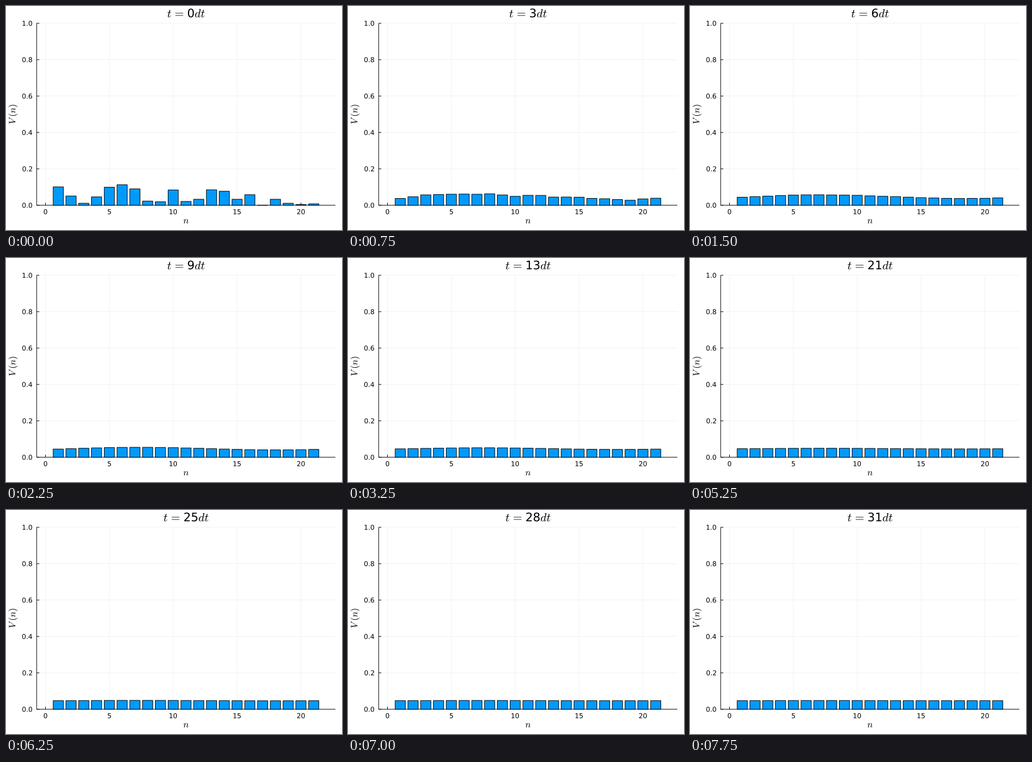
A matplotlib script for the animation above (8000 ms loop, 600x400 px).

```python
import numpy as np
import matplotlib.pyplot as plt
from matplotlib.animation import FuncAnimation
from matplotlib.patches import PathPatch, Rectangle
from matplotlib.textpath import TextPath
from matplotlib.transforms import Affine2D

plt.rcParams["font.family"] = "DejaVu Sans"
plt.rcParams["mathtext.fontset"] = "cm"

W, H, DPI = 600, 400, 100
PX = 72 / DPI  # points per pixel
STEPS, INTERVAL = 32, 250
LEFT, RIGHT, TOP, BASE = 54.8, 588.2, 30.87, 355.8
MID_X, MID_Y = (LEFT + RIGHT) / 2, (TOP + BASE) / 2
X0, UNIT = 70.5, 22.81
TICK = 4.72

START = np.array([101, 51, 11, 46, 99, 113, 90, 23, 19, 84, 21,
                  33, 85, 77, 33, 58, 1, 33, 11, 4, 8]) / 1000


def diffuse(v):
    """Random hop of one or two sites either way on a ring."""
    return sum(np.roll(v, k) for k in (-2, -1, 1, 2)) / 4


states = [START]
for _ in range(STEPS - 1):
    states.append(diffuse(states[-1]))

fig = plt.figure(figsize=(W / DPI, H / DPI), dpi=DPI, facecolor="white")
ax = fig.add_axes([0, 0, 1, 1])
ax.set_xlim(0, W)
ax.set_ylim(H, 0)
ax.axis("off")


def px(n):
    return X0 + UNIT * n


def py(v):
    return BASE - (BASE - TOP) * v


def line(x, y, width=1, z=2, alpha=1):
    ax.plot(x, y, color="black", lw=PX * width, alpha=alpha, zorder=z,
            solid_capstyle="butt", snap=False)


def grid(x, y):
    line(x, y, width=0.5, z=1, alpha=0.1)


def outline(s, size, x, y, align=0.5, turn=0):
    """Glyph outlines on baseline y; align 0..1 picks the anchor in the ink."""
    path = TextPath((0, 0), s, size=size)
    box = path.get_extents()
    anchor = box.x0 + align * box.width
    move = Affine2D().translate(-anchor, 0).scale(1, -1)
    return move.rotate_deg(-turn).translate(x, y).transform_path(path)


def label(*args, **kwargs):
    patch = PathPatch(outline(*args, **kwargs), facecolor="black", lw=0,
                      edgecolor="none", zorder=4, snap=False)
    return ax.add_patch(patch)


for n in range(0, 21, 5):
    x = px(n)
    grid([x, x], [TOP, BASE])
    line([x, x], [BASE, BASE - TICK])
    label(str(n), 12, x, 371.7)

for v in np.linspace(0, 1, 6):
    y = py(v)
    grid([LEFT, RIGHT], [y, y])
    line([LEFT, LEFT + TICK], [y, y])
    label(f"{v:.1f}", 12, 46.6, y + 4.4, align=1)

line([LEFT, LEFT], [TOP, BASE])
line([LEFT, RIGHT], [BASE, BASE])

label("$n$", 16.5, MID_X, 388.2)
label(r"$V\hspace{0.25}(n)$", 16.5, 16.7, MID_Y, turn=90)

bars = []
for n in range(1, len(START) + 1):
    bar = Rectangle((px(n - 0.4), BASE), 0.8 * UNIT, 0, facecolor="#009afa",
                    edgecolor="black", lw=PX, zorder=3, snap=False)
    bars.append(ax.add_patch(bar))


def title_path(i):
    s = rf"$t\hspace{{0.12}}=\hspace{{0.12}}${i}$dt$"
    return outline(s, 21, MID_X, 20.3)


title = label("$t$", 21, MID_X, 20.3)


def draw(i):
    for bar, v in zip(bars, states[i]):
        bar.set_height(py(v) - BASE)
    title.set_path(title_path(i))
    return bars + [title]


anim = FuncAnimation(fig, draw, frames=STEPS, interval=INTERVAL,
                     repeat=True, repeat_delay=0)
plt.show()
```
